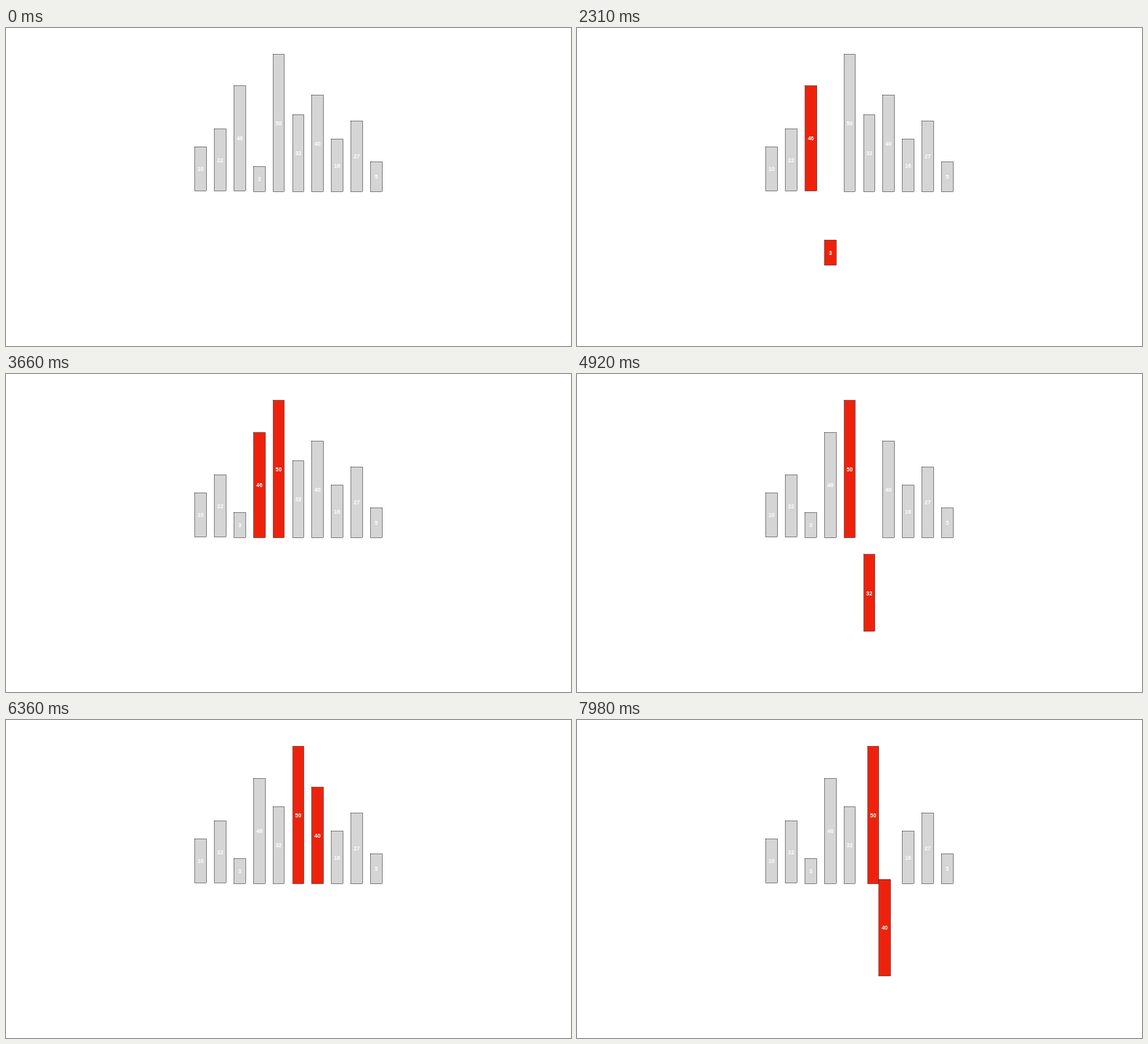
An HTML page with a canvas for the animation above (8 s loop, 720x405 px).

```html
<!DOCTYPE html>
<html lang="en">
<head>
<meta charset="utf-8">
<title>Bubble sort</title>
<style>
html, body { margin: 0; width: 100%; height: 100%; overflow: hidden; background: #fff; }
canvas { display: block; }
</style>
</head>
<body>
<canvas id="stage" width="720" height="405"></canvas>
<script>
const ctx = document.getElementById('stage').getContext('2d');
const LOOP = 8000, TICK = 30;
const FIRST = 470, HOLD = 450, MOVE = 900, SWAP = 2 * MOVE + 470;

const values = [10, 22, 46, 3, 50, 32, 40, 16, 27, 5];
const tops = [151, 128, 73, 176, 33, 110, 85, 141, 118, 170];

const snap = v => Math.round(v) + 0.5;
const slotLeft = i => snap(240 + 24.9 * i);
const slotRight = i => snap(254.85 + 24.9 * i);
const slotBase = i => snap(207.2 + 0.13 * i);

const bars = values.map((value, i) => ({
  value,
  x: slotLeft(i),
  y: tops[i] + 0.5,
  w: slotRight(i) - slotLeft(i),
  h: slotBase(i) - tops[i] - 0.5
}));

// One pass of bubble sort, written out as timed comparisons and swaps.
function planPass() {
  const order = [...bars], compares = [], swaps = [];
  let time = FIRST, swapped = false;
  for (let i = 0; i + 1 < order.length; i++) {
    const [a, b] = [order[i], order[i + 1]];
    compares.push({ time, pair: [a, b] });
    const mustSwap = a.value > b.value;
    if (!mustSwap || swapped) time += HOLD;
    if (mustSwap) {
      swaps.push({
        time, big: a, small: b,
        dx: slotLeft(i + 1) - slotLeft(i),
        sink: slotBase(i + 1) - slotBase(i),
        drop: 94 + 27 * swaps.length
      });
      [order[i], order[i + 1]] = [b, a];
      time += SWAP;
    }
    swapped = mustSwap;
  }
  return { compares, swaps };
}

const { compares, swaps } = planPass();

function ease(t) {
  const p = Math.min(1, Math.max(0, t / MOVE));
  return (1 - Math.cos(Math.PI * p)) / 2;
}

// The smaller bar drops first, then both cross over.
function position(bar, t) {
  let { x, y } = bar;
  for (const s of swaps) {
    const down = ease(t - s.time), cross = ease(t - s.time - MOVE);
    if (bar === s.big) {
      x += s.dx * cross;
      y += s.sink * cross;
    } else if (bar === s.small) {
      x -= s.dx * cross;
      y += s.drop * (down - cross);
    }
  }
  return [x, y];
}

function drawBar(bar, t, active) {
  const [x, y] = position(bar, t);
  ctx.fillStyle = active ? '#ee220c' : '#d5d5d5';
  ctx.fillRect(x, y, bar.w, bar.h);
  ctx.strokeRect(x, y, bar.w, bar.h);
  ctx.fillStyle = '#fff';
  ctx.fillText(bar.value, x + bar.w / 2, y + bar.h / 2 + 2.8);
}

function draw(t) {
  ctx.fillStyle = '#fff';
  ctx.fillRect(0, 0, 720, 405);
  ctx.strokeStyle = '#000';
  ctx.lineWidth = 0.4;
  ctx.font = 'bold 7px "Liberation Sans", Arial, sans-serif';
  ctx.textAlign = 'center';
  const current = compares.filter(c => t >= c.time).pop();
  for (const bar of bars) drawBar(bar, t, current && current.pair.includes(bar));
}

function frame() {
  const t = performance.now() % LOOP;
  draw(Math.floor(t / TICK) * TICK);
  requestAnimationFrame(frame);
}
frame();
</script>
</body>
</html>
```
